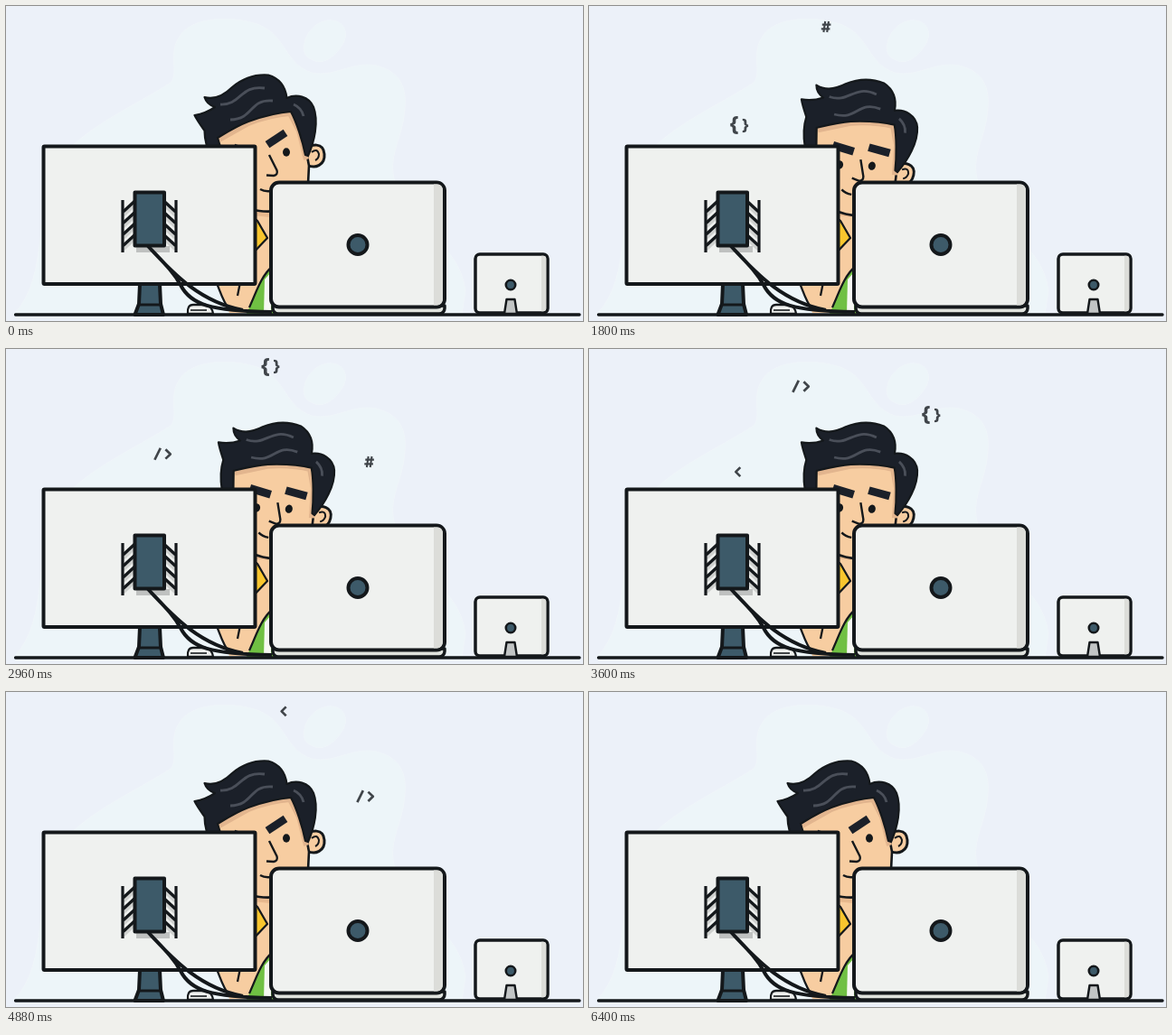
These frames come from a looping animation (638x349 px, 6640 ms). An HTML page with a canvas:

```html
<!DOCTYPE html>
<html lang="en">
<head>
<meta charset="utf-8">
<title>Developer at work</title>
<style>
html, body { margin: 0; width: 100%; height: 100%; overflow: hidden; background: #ecf1f9; }
canvas { display: block; width: 638px; height: 349px; }
</style>
</head>
<body>
<canvas id="stage" width="638" height="349"></canvas>
<script>
const ctx = document.getElementById('stage').getContext('2d');
const LOOP = 6640, STEP = 40;
const INK = '#14181b', PANEL = '#eff1ef', STEEL = '#3d5a69', SKIN = '#f7cda1', HAIR = '#1b2029', SIGN = '#40454a';

function shape(d, fill, stroke, width = 3) {
  const p = new Path2D(d);
  if (fill) { ctx.fillStyle = fill; ctx.fill(p); }
  if (stroke) { ctx.strokeStyle = stroke; ctx.lineWidth = width; ctx.stroke(p); }
}

function box(x, y, w, h, r, fill, stroke, width = 4) {
  ctx.beginPath();
  ctx.roundRect(x, y, w, h, r);
  ctx.fillStyle = fill;
  ctx.fill();
  if (stroke) { ctx.strokeStyle = stroke; ctx.lineWidth = width; ctx.stroke(); }
}

function oval(x, y, rx, ry, fill, stroke, width) {
  ctx.beginPath();
  ctx.ellipse(x, y, rx, ry, 0, 0, Math.PI * 2);
  ctx.fillStyle = fill;
  ctx.fill();
  if (stroke) { ctx.strokeStyle = stroke; ctx.lineWidth = width; ctx.stroke(); }
}

const mix = (a, b, k) => a + (b - a) * k;
function ease(t, start, length) {
  const k = Math.min(1, Math.max(0, (t - start) / length));
  return k * k * (3 - 2 * k);
}

// Time, x and y along the arc from the monitor to the laptop
const ARC = [
  [560, 156.5, 161], [1000, 175, 112], [1425, 211, 62], [1800, 262, 23], [2070, 308, 21.5],
  [2250, 336, 31], [2560, 373, 65], [2960, 401.5, 125], [3250, 415, 161], [3560, 423, 202]
];

function slope(i, axis) {
  const a = ARC[Math.max(0, i - 1)], b = ARC[Math.min(ARC.length - 1, i + 1)];
  return (b[axis] - a[axis]) / (b[0] - a[0]);
}

function arcAt(t) {
  if (t < ARC[0][0] || t > ARC[ARC.length - 1][0]) return null;
  let i = 0;
  while (i < ARC.length - 2 && t > ARC[i + 1][0]) i++;
  const a = ARC[i], b = ARC[i + 1], span = b[0] - a[0], u = (t - a[0]) / span;
  return [1, 2].map(n =>
    (1 + 2 * u) * (1 - u) ** 2 * a[n] + u * (1 - u) ** 2 * span * slope(i, n) +
    u * u * (3 - 2 * u) * b[n] + u * u * (u - 1) * span * slope(i + 1, n));
}

function glyph(text, size, x) {
  ctx.font = `800 ${size}px Inter, sans-serif`;
  ctx.fillStyle = SIGN;
  ctx.textAlign = 'center';
  ctx.textBaseline = 'alphabetic';
  const m = ctx.measureText(text);
  ctx.fillText(text, x, (m.actualBoundingBoxAscent - m.actualBoundingBoxDescent) / 2);
}

const SIGNS = [
  { delay: 0, draw: () => shape('M-2.6 6L-.8-6M1.2 6L3-6M-4.2-2.4H5.4M-5.2 2.4H4.4', null, SIGN, 2.1) },
  { delay: 980, draw: () => { glyph('{', 22.5, -6); glyph('}', 17, 7); } },
  { delay: 1990, draw: () => shape('M-8.8 7.3L-2.4-5.7M3.2-4.2L8.6 1L3.2 6.2', null, SIGN, 2.7) },
  { delay: 2815, draw: () => shape('M2.5-5L-2.5 0L2.5 5', null, SIGN, 2.7) }
];

function signs(t) {
  for (const s of SIGNS) {
    const p = arcAt(t - s.delay);
    if (!p) continue;
    ctx.save();
    ctx.translate(p[0], p[1]);
    s.draw();
    ctx.restore();
  }
}

function backdrop() {
  ctx.fillStyle = '#ecf1f9';
  ctx.fillRect(0, 0, 638, 349);
  const pale = '#edf5f9', rim = '#f0f6fa';
  shape('M8 342C50 300 28 220 60 168C95 130 140 112 182 85C192 74 178 52 193 32C207 12 251 10 280 21C311 34 307 63 338 74C365 80 388 57 416 68C443 78 443 101 440 122C437 148 422 167 430 195C443 248 500 258 508 315L504 342Z', pale, rim, 1);
  shape('M330 51C327 38 337 19 355 16C371 14 379 26 374 39C368 51 355 65 342 61C336 59 331 56 330 51Z', pale, rim, 1);
}

function body() {
  shape('M262 222H300V340H247L234 308Z', SKIN);
  shape('M262 231L292 234V226H262Z', '#e8b98e');
  shape('M270 231L278 238L289 257L270 277Z', '#f9c62e', INK, 2.3);
  shape('M294 290C282 300 276 317 269 334L266 341H296Z', '#70c043');
  shape('M286 303L293 295V341H285Z', '#f6f8f3');
  shape('M294 289C282 299 276 319 269 334', null, INK, 2.3);
  shape('M233 307C237 317 241 330 247 336M259 306L256 321', null, INK, 2.3);
}

function brow(x, y, deg) {
  ctx.save();
  ctx.translate(x, y);
  ctx.rotate(deg * Math.PI / 180);
  shape('M-12-4.3L12-4.5L12 4.2L-12 4.5Z', HAIR);
  ctx.restore();
}

// k: 0 is the stern, leaning pose; 1 is the upright, calm one
function head(k) {
  ctx.save();
  ctx.translate(279, 198);
  ctx.rotate(17.5 * k * Math.PI / 180);
  ctx.translate(-279, -198);
  shape('M332 160C337 152 351 151 352 164C353 176 342 181 333 176Z', SKIN, INK, 3);
  shape('M338 162Q344 157 346 164Q346 169 342 171', null, INK, 2);
  shape('M232 135L229 166C232 200 245 223 280 227C302 230 327 222 334 197L335 177L330 150L314 106Z', SKIN, INK, 2.6);
  shape('M332 170L324 138L314 119C298 120 283 124 268 130L236 148', null, '#e2b58e', 6);
  shape('M208.5 121C216 120 224 117 231 112C225 110 221 106 219.5 101C231 104 241 99 250 90C263 79 276 75.5 290 76.5C302 80 309 89 310.5 102C321 97 335 100 340 112C346 128 341 150 334 166L331 165C328 150 321 128 315 117C300 118 285 122 268 128C255 133 244 140 234 146L240 166L228 170C222 158 219.5 149 219.5 138C216 133 211.5 127 208.5 121Z', HAIR, INK, 2.2);
  shape('M237 109C260 110 259 87 286 91M248 126C275 125 268 103 295 105M318 109Q327 113 329 122', null, '#4a4f59', 2.8);
  brow(mix(299, 307.5, k), mix(147, 149, k), mix(-33, -1.5, k));
  brow(mix(263, 269, k), mix(161, 159, k), mix(20, 0, k));
  oval(mix(310, 305, k), mix(162, 168, k), 4, 4.7, INK);
  oval(270.5, 177.6, 4, 4.7, INK);
  shape('M291 165L299.5 182Q301 187 296 188L288 187.5', null, INK, 2.4);
  shape('M281 203Q286 206 293 205', null, INK, 2.4);
  ctx.restore();
}

function monitor() {
  shape('M148 308H170L171 330L174 342H142.5L147 330Z', STEEL, INK, 4);
  shape('M147 331H171', null, INK, 3);
  box(41.5, 155.5, 234, 152.5, 1, PANEL, INK);
  shape('M144 266H181V273H144Z', '#bfc1c0');
  for (const side of [-1, 1]) {
    ctx.save();
    ctx.translate(158.5, 0);
    ctx.scale(side, 1);
    for (let y = 216; y < 260; y += 12.5) {
      shape(`M16 ${y + 4}L29 ${y + 16}`, null, '#cfd1cf', 4);
      shape(`M16 ${y}L29 ${y + 12}`, null, INK, 3.4);
    }
    shape('M29.5 215V273', null, INK, 3.2);
    ctx.restore();
  }
  box(142.5, 206.5, 32.5, 59, 0, STEEL, INK);
}

function laptop() {
  box(295, 332, 190, 9, [0, 0, 6, 6], '#dfe2dd', INK, 3.5);
  box(293, 195.5, 192, 138, 9, PANEL, INK);
  shape('M473 197.5H478Q483 198 483 205V325Q482 331 477 331.5H473Z', '#dcddd9');
  oval(389, 264.5, 10.5, 10.5, STEEL, INK, 4);
}

function tablet() {
  box(519, 275, 80, 65, 5, PANEL, INK, 3.5);
  shape('M592 276.7H594Q597.3 277 597.3 280V335Q597 338 594 338.3H592Z', '#dcddd9');
  oval(558, 309, 5.2, 5.2, STEEL, INK, 2.6);
  shape('M553.5 325H562.5L565 341H551Z', '#c2c5c5', INK, 2.4);
}

function draw(t) {
  ctx.lineCap = 'butt';
  ctx.lineJoin = 'round';
  backdrop();
  body();
  head(ease(t, 1320, 440) - ease(t, 4400, 440));
  signs(t);
  monitor();
  shape('M201 341Q200 331 207 331H221Q228 333 229 341Z', PANEL, INK, 2.3);
  shape('M204 337H222', null, INK, 1.6);
  shape('M157 266C173 283 185 294 193 309C204 331 226 338 294 339M157 266C188 300 216 328 262 337', null, INK, 4);
  laptop();
  tablet();
  ctx.lineCap = 'round';
  shape('M10.5 342H634', null, INK, 3.4);
}

const begin = performance.now();
function tick() {
  const t = (performance.now() - begin) % LOOP;
  draw(Math.floor(t / STEP) * STEP);
  requestAnimationFrame(tick);
}
tick();
</script>
</body>
</html>
```
